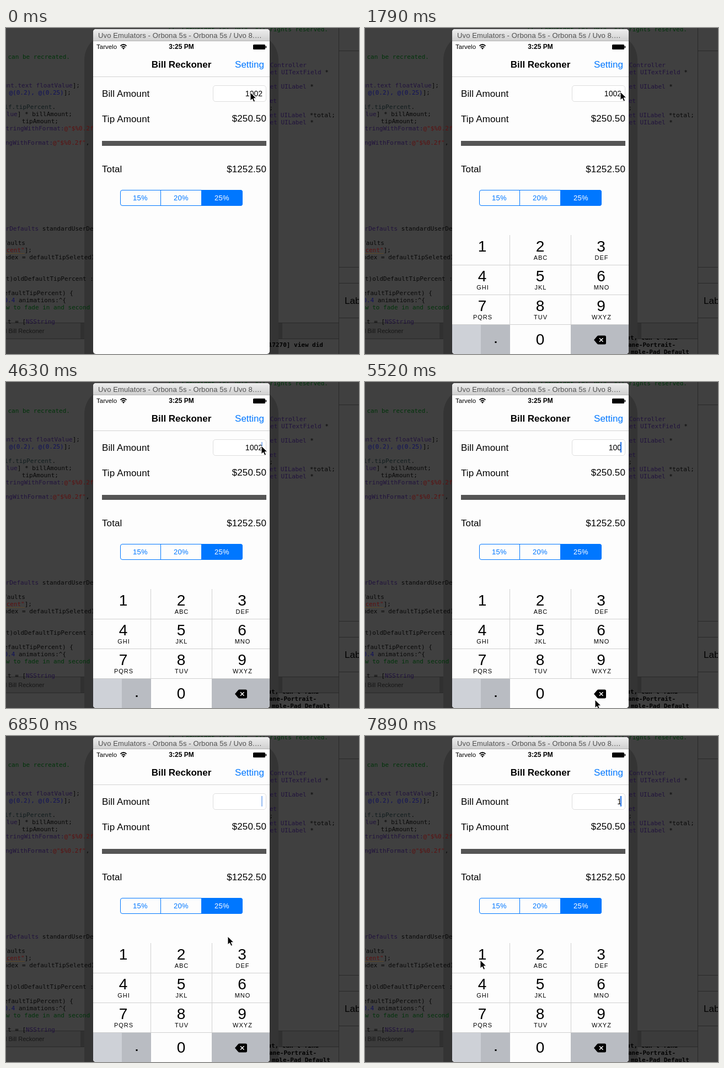
Recreate the animation shown at these times as an HTML page. Size 640 by 592 pixels, loop 8 s.

```html
<!DOCTYPE html>
<html lang="en">
<head>
<meta charset="utf-8">
<title>Bill Reckoner</title>
<style>
html, body { margin: 0; width: 100%; height: 100%; overflow: hidden; background: #404040; }
svg { display: block; width: 640px; height: 592px; font-family: "Liberation Sans", Arial, sans-serif; }
text { white-space: pre; }
.code { font: 11px "DejaVu Sans Mono", Menlo, monospace; }
.label { font-size: 17px; letter-spacing: .12px; }
.end { text-anchor: end; }
.mid { text-anchor: middle; }
.bold { font-weight: bold; }
.blue { fill: #0077ff; }
</style>
</head>
<body>
<svg viewBox="0 0 640 592">
  <defs>
    <linearGradient id="bar" x2="0" y2="1">
      <stop stop-color="#eeeeee"/><stop offset="1" stop-color="#cfcfcf"/>
    </linearGradient>
    <clipPath id="window"><rect x="158" y="2" width="320" height="590" rx="5"/></clipPath>
    <clipPath id="segments"><rect x="207" y="294" width="222" height="29" rx="4"/></clipPath>
  </defs>

  <rect width="640" height="592" fill="#404040"/>
  <rect y="535" width="603" height="30" fill="#3b3b3b"/>
  <path d="M0 535.5H603M0 564.5H603M603.5 0V592M603 41.5H640M603 434.5H640M603 463.5H640M603 526.5H640" stroke="#292929"/>
  <rect x="135" y="536" width="366" height="28" fill="#303030"/>
  <rect x="142" y="10" width="352" height="640" rx="48" fill="#343434"/>
  <g id="code" class="code"></g>
  <text x="-1" y="554" font-size="11" fill="#161616">l Bill Reckoner</text>
  <text x="614" y="501" font-size="17">Lab</text>
  <g class="code bold">
    <text id="log1" class="end" x="575" y="579">[17270] view did</text>
    <g id="log2">
      <text class="end" x="567" y="566">layout, can't find</text>
      <text class="end" x="563" y="579">ane-Portrait-</text>
      <text class="end" x="588" y="592">mple-Pad_Default</text>
    </g>
  </g>
  <rect x="501" y="536" width="102" height="28" fill="#3b3b3b"/>

  <g clip-path="url(#window)">
    <rect x="158" y="2" width="320" height="590" fill="#fdfdfd"/>
    <rect x="158" y="2" width="320" height="22" fill="url(#bar)"/>
    <path d="M158 23.5H478" stroke="#b4b4b4"/>
    <text x="167" y="18" font-size="13" letter-spacing=".12" fill="#505050">Uvo Emulators - Orbona 5s - Orbona 5s / Uvo 8.…</text>

    <text x="164" y="38" font-size="11.5">Tarvelo</text>
    <g fill="none" stroke="#000" stroke-width="1.7">
      <path d="M207.5 32.5Q213 27.5 218.5 32.5M209.7 35Q213 32 216.3 35"/>
    </g>
    <path d="M210.8 36.5Q213 34.8 215.2 36.5L213 39Z"/>
    <text class="mid bold" x="318" y="38" font-size="12">3:25 PM</text>
    <rect x="448" y="30" width="22" height="9" rx="1.5"/>
    <rect x="470.5" y="32.5" width="1.8" height="4" rx="1"/>

    <text class="mid bold" x="318" y="72" font-size="17">Bill Reckoner</text>
    <text class="end blue" x="468" y="72" font-size="17">Setting</text>
    <path d="M158 88.5H478" stroke="#d2d2d2"/>

    <g class="label">
      <text x="174" y="125">Bill Amount</text>
      <text x="174" y="171">Tip Amount</text>
      <text x="174" y="262">Total</text>
      <text class="end" x="472" y="170">$250.50</text>
      <text class="end" x="472" y="262">$1252.50</text>
    </g>
    <rect x="174" y="205" width="298" height="9" fill="#555"/>
    <rect x="375.5" y="104.5" width="96" height="29" rx="4.5" fill="#fff" stroke="#dedede"/>
    <text id="bill" class="end" x="465" y="124" font-size="14"></text>
    <rect id="caret" x="463" y="109" width="2" height="19" fill="#1f6fe5"/>

    <rect x="354" y="294" width="75" height="29" clip-path="url(#segments)" class="blue"/>
    <rect x="207.5" y="294.5" width="221" height="28" rx="3.5" fill="none" stroke="#0077ff"/>
    <path d="M280.5 294V323M354.5 294V323" stroke="#0077ff"/>
    <g class="mid blue" font-size="13" letter-spacing=".3">
      <text x="243.5" y="313">15%</text>
      <text x="317.5" y="313">20%</text>
      <text x="391.5" y="313" fill="#fff">25%</text>
    </g>

    <g id="pad"></g>
  </g>

  <path id="mouse" d="M0 0V15L3.5 11.8L6 17.3L8.6 16.2L6.2 10.8H11Z" stroke="#fff" stroke-width="1"/>
</svg>
<script>
const $ = id => document.getElementById(id);
const LOOP = 8000, STEP = 148.9;
const INK = '#080808', GREEN = '#00330a', RED = '#5c1010', PURPLE = '#20123c', BLUE = '#10105a', TEAL = '#101c1d';

// Each row: x, baseline, then colour and text pairs; a negative baseline aligns to the right.
const rows = [
  [116, -56, GREEN, 'can be recreated.'],
  [134, -108, PURPLE, 'unt.text floatValue', INK, '];'],
  [118, -121, BLUE, '@(0.2), @(0.25)', INK, '];'],
  [90, -147, TEAL, 'lf.tipPercent', INK, '.'],
  [120, -160, PURPLE, 'alue', INK, '] * billAmount;'],
  [95, -173, INK, 'tipAmount;'],
  [-7, 186, PURPLE, 'stringWithFormat:', RED, '@"$%0.2f"'],
  [-1, 212, PURPLE, 'ngWithFormat:', RED, '@"$%0.2f"', INK, ','],
  [-7, 368, PURPLE, 'erDefaults ', INK, 'standardUserDefaults'],
  [35, -394, INK, 'faults'],
  [47, -407, RED, 'cent"', INK, '];'],
  [-4, 420, INK, 'ndex = defaultTipSeletedI'],
  [0, 459, INK, 't)oldDefaultTipPercent :'],
  [122, -485, INK, 'efaultTipPercent) {'],
  [109, -498, BLUE, '0.4', INK, ' animations:^{'],
  [0, 511, GREEN, 'w to fade in and second view'],
  [89, -537, INK, 't = [', PURPLE, 'NSString'],
  [584, -6, GREEN, '//  Copyright (c) 2014. All rights reserved.'],
  [545, -71, PURPLE, 'Controller'],
  [585, -84, PURPLE, 'et UITextField', INK, ' *'],
  [558, -110, PURPLE, 'et UILabel', INK, ' *'],
  [491, -136, PURPLE, 'et'],
  [484, -149, INK, ';'],
  [597, -162, PURPLE, 'et UILabel', INK, ' *total;'],
  [558, -175, PURPLE, 'et UILabel', INK, ' *']
];
$('code').innerHTML = rows.map(([x, y, ...runs]) => {
  let spans = '';
  for (let i = 0; i < runs.length; i += 2) spans += `<tspan fill="${runs[i]}">${runs[i + 1]}</tspan>`;
  return `<text x="${x}" y="${Math.abs(y)}"${y < 0 ? ' class="end"' : ''}>${spans}</text>`;
}).join('') + '<path d="M0 409.5H34" stroke="#6a4a1c" stroke-dasharray="2 1"/>';

// Keypad in its resting place
const letters = ['', 'ABC', 'DEF', 'GHI', 'JKL', 'MNO', 'PQRS', 'TUV', 'WXYZ'];
const centers = [212.5, 317.5, 428];
const box = (x, y, w, h, fill, id = '') => `<rect id="${id}" x="${x}" y="${y}" width="${w}" height="${h}" fill="${fill}"/>`;
const digit = (x, y, s) => `<text class="mid" x="${x}" y="${y}" font-size="28">${s}</text>`;
$('pad').innerHTML =
  box(158, 375, 320, 217, '#fdfdfd') + box(158, 376, 104, 54, '#fdfdfd', 'one') +
  box(158, 539, 52, 53, '#ced1d7') + box(210, 539, 53, 53, '#b9bcc2') + box(373, 539, 105, 53, '#b9bcc2', 'erase') +
  '<path d="M262.5 376V538M373.5 376V538M158 430.5H478M158 484.5H478M158 538.5H478" stroke="#d0d0d0"/>' +
  letters.map((s, i) => {
    const x = centers[i % 3], y = 406 + 54 * Math.floor(i / 3);
    return digit(x, y, i + 1) +
      `<text class="mid" x="${x + 1}" y="${y + 15}" font-size="11" letter-spacing="1">${s}</text>`;
  }).join('') +
  digit(317.5, 575, 0) +
  box(235.5, 569, 3, 3, '#000') +
  '<path d="M415 566.5L421 559.5Q422 558.5 423 558.5H434.5Q437 558.5 437 561V572Q437 574.5 434.5 574.5H423Q422 574.5 421 573.5Z"/>' +
  '<path d="M425 563.2L431.6 569.8M431.6 563.2L425 569.8" stroke="#fff" stroke-width="1.4"/>';

const path = [
  [0, 443, 117], [290, 443, 117], [600, 463, 116], [4620, 463, 116], [5400, 417, 577],
  [6560, 417, 577], [6849, 402, 364], [7440, 203, 396], [7700, 200, 396], [7850, 209, 407], [LOOP, 209, 407]
];
const typed = [[0, '1002'], [5500, '100'], [5800, '10'], [6100, '1'], [6390, ''], [7580, '1']];
const within = (t, a, b) => t >= a && t < b;

function mouseAt(t) {
  const i = path.findIndex(p => p[0] > t);
  const [a, x, y] = path[i - 1], [b, u, v] = path[i];
  let k = (t - a) / (b - a);
  k *= k * (3 - 2 * k);
  return [x + (u - x) * k, y + (v - y) * k];
}

function caretAt(t) {
  if (t < 880) return 0;
  const start = t < 5500 ? 1640 : 6780;
  if (t < start || t > 7500) return 1;
  const m = (t - start) % 970;
  return m < 280 ? Math.max(0, 1 - m / 130) : Math.min(1, Math.max(0, (m - 430) / 130));
}

function frame() {
  // The screen refreshes about seven times a second.
  const t = Math.floor((performance.now() % LOOP + 4) / STEP) * STEP;
  const slide = Math.min(1, Math.max(0, (t - 972) / 732));
  const open = t > 972;
  $('pad').setAttribute('transform', `translate(0 ${Math.round(217 * (1 - slide) ** 4)})`);
  $('log1').style.display = open ? 'none' : '';
  $('log2').style.display = open ? '' : 'none';
  $('bill').textContent = typed.filter(s => s[0] <= t).pop()[1];
  $('caret').style.opacity = caretAt(t);
  const erasing = within(t, 5500, 5650) || within(t, 5800, 5950) || within(t, 6100, 6250);
  $('erase').setAttribute('fill', erasing ? '#fdfdfd' : '#b9bcc2');
  $('one').setAttribute('fill', within(t, 7580, 7730) ? '#b9bcc2' : '#fdfdfd');
  $('mouse').setAttribute('transform', `translate(${mouseAt(t)})`);
  requestAnimationFrame(frame);
}
frame();
</script>
</body>
</html>
```
